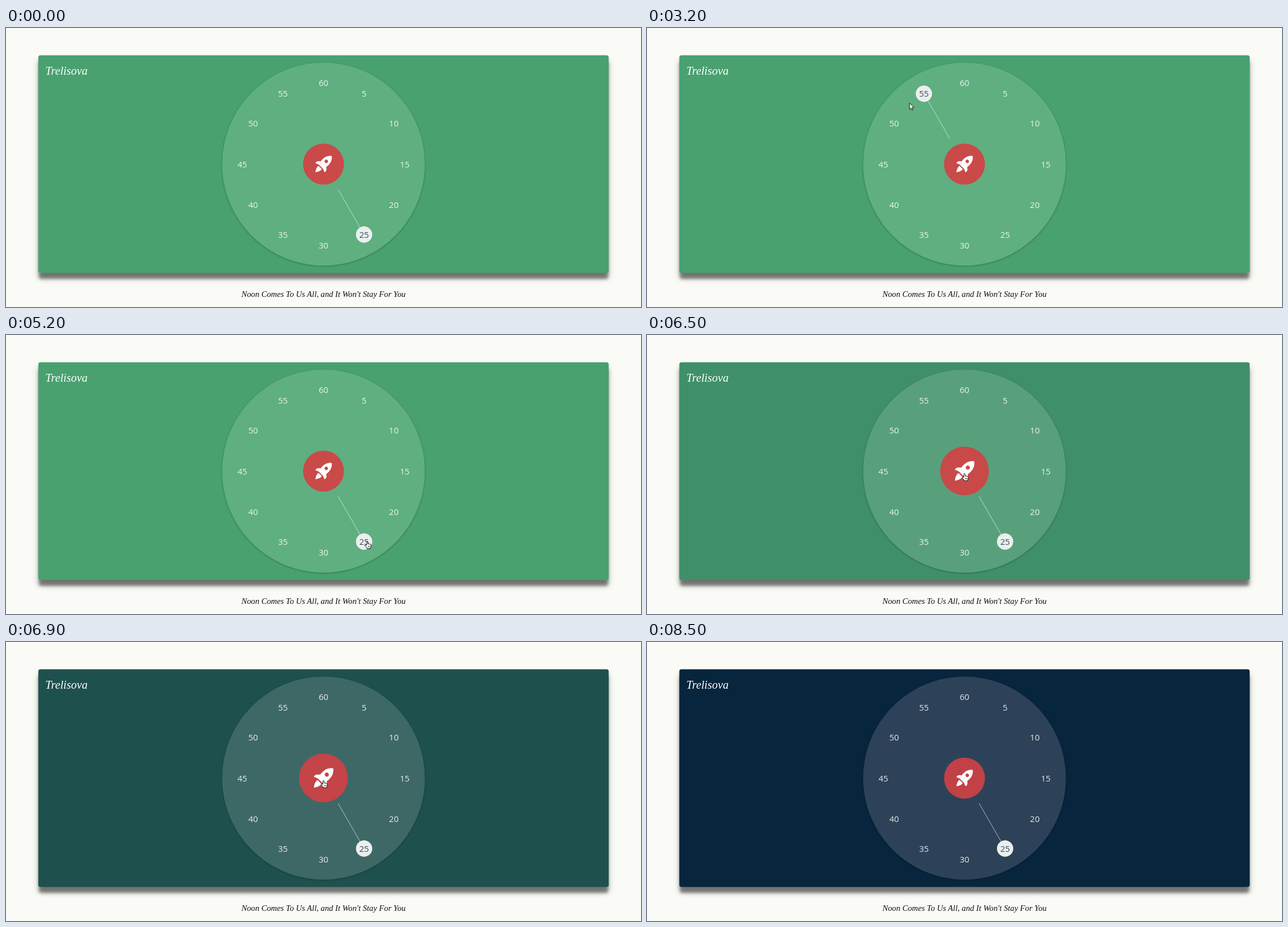
Animation, 1130 px wide and 496 px high, one loop 8900 ms. Source, as an HTML page:

```html
<!DOCTYPE html>
<html lang="en">
<head>
<meta charset="utf-8">
<title>Timer dial</title>
<style>
  html, body { margin: 0; width: 100%; height: 100%; overflow: hidden; background: #fafaf6; }
  svg { display: block; width: 100%; height: 100%; }
  .script { font-family: "Liberation Serif", serif; font-style: italic; }
  .num { font: 15px "Open Sans", sans-serif; text-anchor: middle; fill: #fff; fill-opacity: .88; }
  .picked { fill: #2d5266; fill-opacity: 1; }
</style>
</head>
<body>
<svg viewBox="0 0 1130 496">
  <defs>
    <filter id="near" x="-5%" y="-10%" width="110%" height="120%"><feGaussianBlur stdDeviation="2.4"/></filter>
    <filter id="far" x="-5%" y="-15%" width="110%" height="130%"><feGaussianBlur stdDeviation="6"/></filter>
    <filter id="rim" x="-5%" y="-5%" width="110%" height="110%"><feGaussianBlur stdDeviation="1.5"/></filter>
  </defs>

  <rect width="1130" height="496" fill="#fafaf6"/>
  <rect x="57.5" y="57" width="1015" height="388" rx="4" opacity=".26" filter="url(#far)"/>
  <rect x="58.5" y="60" width="1013" height="386" rx="4" opacity=".4" filter="url(#near)"/>
  <rect id="card" x="57.5" y="48.4" width="1015" height="387.2" rx="4"/>
  <text class="script" x="70" y="83" font-size="20.4" fill="#fff">Trelisova</text>
  <text class="script" x="565" y="477.5" font-size="14.7" fill="#111" text-anchor="middle">Noon Comes To Us All, and It Won't Stay For You</text>

  <circle cx="565" cy="243" r="180.8" opacity=".24" filter="url(#rim)"/>
  <circle id="dial" cx="565" cy="242" r="180.4"/>

  <g id="hand">
    <line y1="-52" y2="-131" stroke="#fff" stroke-width=".8" stroke-opacity=".7"/>
    <circle cy="-144.5" r="14.5" fill="#ecefec"/>
  </g>
  <g id="nums"></g>

  <g id="button">
    <circle id="disc" r="36.4"/>
    <g transform="rotate(45)" fill="#fff">
      <path d="M0 -20.5C6.5 -16 8.5 -8 7 0L11 3.5Q12.6 5.5 11.5 9L5.5 6.5H-5.5L-11.5 9Q-12.6 5.5 -11 3.5L-7 0C-8.5 -8 -6.5 -16 0 -20.5Z"/>
      <path d="M0 20.5Q-5 14 -4.2 8.5H4.2Q5 14 0 20.5Z"/>
      <circle id="port" cy="-7" r="3"/>
    </g>
  </g>

  <g id="cursor" fill="#fff" stroke="#111" stroke-width="1" stroke-linejoin="round">
    <path id="arrow" d="M.5 .8V11.6L3 9.4L4.8 13.4L6.7 12.5L5 8.7H8.4Z"/>
    <g id="pointer">
      <path d="M-1.2 7.2V1.4Q-1.2 .4 -.1 .4Q1 .4 1 1.4V4.8Q2 4 3 5Q4 4.4 5 5.4Q6.8 5 6.8 6.8V9Q6.6 10.6 5.8 11.4V13H-.8V11.8L-4.2 8Q-4.6 6.6 -3.2 6.4Z"/>
      <path d="M1.4 8V10.6M3.1 8V10.6M4.8 8V10.6" stroke-width=".7"/>
    </g>
  </g>
</svg>

<script>
const LOOP = 8900, STEP = 100, CX = 565, CY = 242;
const GRIP = 147; // pointer's distance from the centre while dragging
const $ = id => document.getElementById(id);
const clamp = v => Math.max(0, Math.min(1, v));
const ramp = (t, from, to) => clamp((t - from) / (to - from));
const smooth = v => v * v * (3 - 2 * v);
const lerp = (a, b, k) => a + (b - a) * k;
const lerpAll = (a, b, k) => a.map((v, i) => lerp(v, b[i], k));

// Drag around the dial: time, degrees clockwise from the top
const drag = [
  [1100, 150], [1700, 119], [1800, 104], [1900, 104], [2500, 28], [2600, 28],
  [2800, 2], [2900, 2], [3200, -42], [3800, -89], [4800, -178], [4900, -178], [5200, -212]
];

const colors = {
  card: [[72, 161, 111], [7, 38, 61]],
  dial: [[95, 175, 129], [45, 66, 88]],
  disc: [[201, 74, 72], [194, 65, 70]]
};
colors.port = colors.disc;

const polar = (deg, r) => {
  const a = deg * Math.PI / 180;
  return [CX + r * Math.sin(a), CY - r * Math.cos(a)];
};

const labels = [];
for (let m = 5; m <= 60; m += 5) {
  const el = document.createElementNS("http://www.w3.org/2000/svg", "text");
  const [x, y] = polar(m * 6, 144.5);
  el.setAttribute("x", x);
  el.setAttribute("y", y + 5.5);
  el.textContent = m;
  $("nums").append(el);
  labels.push([m, el]);
}

function angleAt(t) {
  const i = Math.max(1, drag.findIndex(k => t < k[0]));
  if (t >= drag.at(-1)[0]) return drag.at(-1)[1];
  const [t0, a0] = drag[i - 1], [t1, a1] = drag[i];
  return lerp(a0, a1, ramp(t, t0, t1));
}

// Enter from below, follow the drag, go to the button, leave by the top left
function pointerAt(t) {
  const grip = polar(angleAt(t), GRIP);
  if (t < 1100) return lerpAll([630, 457], grip, ramp(t, 400, 900));
  const button = lerpAll(grip, [CX, CY + 4], ramp(t, 5500, 6200));
  return lerpAll(button, [75, 26], ramp(t, 7600, 8300));
}

function draw(time) {
  const t = Math.floor(time % LOOP / STEP) * STEP;

  const minute = (Math.round(angleAt(t) / 30) * 5 + 60) % 60 || 60;
  $("hand").setAttribute("transform", `translate(${CX} ${CY}) rotate(${minute * 6})`);
  for (const [m, el] of labels) el.setAttribute("class", m === minute ? "num picked" : "num");

  const fade = smooth(ramp(t, 6250, 7330));
  for (const id in colors) {
    $(id).setAttribute("fill", `rgb(${lerpAll(...colors[id], fade).map(Math.round)})`);
  }

  const hover = smooth(ramp(t, 5900, 6200)) - smooth(ramp(t, 7700, 8000));
  $("button").setAttribute("transform", `translate(${CX} ${CY - .3 * hover}) scale(${1 + .19 * hover})`);

  const [x, y] = pointerAt(t);
  const [hx, hy] = polar(minute * 6, 144.5);
  const dragging = t > 1100 && t < 5200;
  const active = Math.hypot(x - CX, y - CY) < 40 ||
    !dragging && Math.hypot(x - hx, y - hy) < 15;
  $("cursor").setAttribute("transform", `translate(${x} ${y})`);
  $("cursor").setAttribute("visibility", t >= 400 && t < 8500 ? "visible" : "hidden");
  $("arrow").setAttribute("display", active ? "none" : "inline");
  $("pointer").setAttribute("display", active ? "inline" : "none");
}

const start = performance.now();
function tick() {
  draw(performance.now() - start);
  requestAnimationFrame(tick);
}
tick();
</script>
</body>
</html>
```
